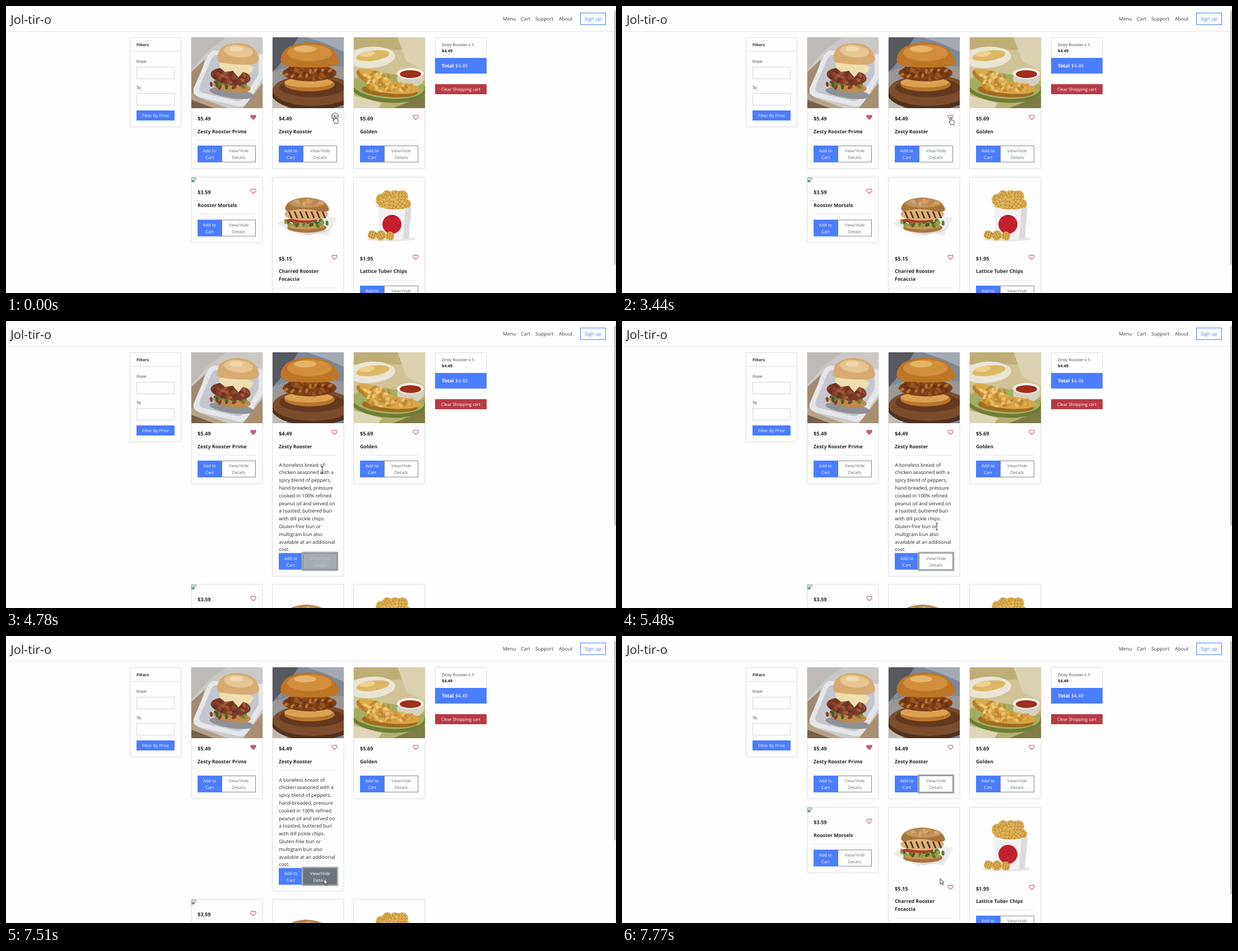
An HTML page that plays this animation: 1089 px wide and 514 px high, repeating every 8000 ms.

```html
<!DOCTYPE html>
<html lang="en">
<head>
<meta charset="utf-8">
<title>Menu</title>
<style>
  html, body { margin: 0; width: 100%; height: 100%; overflow: hidden; background: #fefefe; }
  svg { display: block; width: 1089px; height: 514px; }
  text { font-family: "Open Sans", "Noto Sans", sans-serif; text-rendering: geometricPrecision; white-space: pre; }
</style>
</head>
<body>
<svg id="stage" viewBox="0 0 1089 514" xmlns="http://www.w3.org/2000/svg"></svg>
<script>
const BLUE = '#4a7dff', GRAY = '#6c757d', INK = '#212529', PINK = '#bd5f7f', EDGE = '#dcdcdc';

// Markup helpers
const box = (x, y, w, h, fill, extra = '') =>
  `<rect x="${x}" y="${y}" width="${w}" height="${h}" fill="${fill}" ${extra}/>`;
const frame = (x, y, w, h, color, extra = '') =>
  box(x + .5, y + .5, w - 1, h - 1, 'none', `stroke="${color}" ${extra}`);
const line = (x1, x2, y, color) => box(x1, y, x2 - x1, 1, color);
const shape = (d, fill, extra = '') => `<path d="${d}" fill="${fill}" ${extra}/>`;
const oval = (x, y, rx, ry, fill, turn = 0) =>
  `<ellipse cx="${x}" cy="${y}" rx="${rx}" ry="${ry}" fill="${fill}" transform="rotate(${turn} ${x} ${y})"/>`;
const group = (x, y, body, extra = '') => `<g transform="translate(${x} ${y})" ${extra}>${body}</g>`;

// y is the middle of the capital letters
function label(x, y, str, size, { fill = INK, bold = false, mid = false, id = '' } = {}) {
  return `<text x="${x}" y="${(y + size * .36).toFixed(2)}" font-size="${size}" fill="${fill}"` +
    `${bold ? ' font-weight="700"' : ''}${mid ? ' text-anchor="middle"' : ''}${id ? ` id="${id}"` : ''}>${str}</text>`;
}

// Food pictures, 127 x 127
const crumbs = (n, x, y, rx, ry, colors) => Array.from({ length: n }, (_, i) => {
  const a = i * 2.4, r = Math.sqrt((i + .5) / n);
  return oval(x + rx * r * Math.cos(a), y + ry * r * Math.sin(a), 4.5, 2.6, colors[i % colors.length], i * 47);
}).join('');

const deluxe = () =>
  box(0, 0, 127, 127, '#cbc9c6') +
  shape('M0 0H62L30 24L0 58Z', '#bdbab8') +
  shape('M0 62L24 40L8 96L0 104Z', '#a08a70') +
  shape('M0 98L14 108L64 127H0Z', '#b6a288') +
  shape('M0 112L40 127H0Z', '#75604c') +
  shape('M92 127L127 82V127Z', '#a88f70') +
  shape('M40 24Q31 26 27 38L4 92Q2 104 16 108L82 123Q95 126 102 114L127 74V30Z', '#e4e6ea') +
  shape('M44 32Q37 33 34 42L14 90Q13 98 22 100L80 114Q90 116 96 106L120 66V36Z', '#c3c7cd') +
  oval(72, 100, 40, 9, '#8f9196', 8) +
  oval(72, 88, 34, 10, '#c08b48', 8) +
  crumbs(18, 68, 84, 33, 8, ['#4c5a2b', '#6d7b3a', '#8a3f30']) +
  oval(70, 70, 36, 15, '#7c3a28', 8) +
  crumbs(22, 70, 70, 32, 12, ['#8f4a30', '#a25a3a', '#6b3022']) +
  shape('M50 46Q78 36 112 54L104 66L92 62L84 72L74 60L60 62L50 54Z', '#f0dfae') +
  shape('M46 40Q45 12 82 10Q118 12 121 40Q117 50 100 49Q72 49 58 46Q47 46 46 40Z', '#d7ab70') +
  oval(84, 25, 26, 11, '#e6c592', 6) + oval(80, 21, 12, 5, '#f0d8ae');

const classic = () =>
  box(0, 0, 127, 127, '#7e8897') +
  shape('M0 0H46L20 40L0 62Z', '#575960') +
  shape('M60 0H127V26L96 12Z', '#a3a9b3') +
  shape('M0 62L40 48L127 52V92H0Z', '#9a9795') +
  shape('M0 92L30 110L26 127H0Z', '#c0bab2') +
  oval(72, 100, 74, 31, '#50301d') + oval(72, 95, 72, 28, '#7b4d2d') +
  oval(70, 90, 58, 17, '#63391f') +
  oval(66, 84, 45, 13, '#b8742c') + oval(64, 81, 43, 9, '#dda154') +
  oval(66, 64, 48, 15, '#7a3d14') +
  crumbs(34, 66, 64, 46, 12, ['#9a5420', '#6a3311', '#b96f2f', '#84461a']) +
  shape('M14 41Q16 12 64 9Q112 11 119 42Q119 52 98 53Q62 56 30 52Q15 50 14 41Z', '#bd7526') +
  oval(66, 28, 40, 15, '#d18e3c') + oval(58, 21, 20, 6, '#e7b569');

const strips = () =>
  box(0, 0, 127, 127, '#cfc397') +
  shape('M0 0H127V22H0Z', '#bfae78') +
  oval(30, 36, 44, 19, '#e9e5d4', -4) + oval(34, 33, 30, 9, '#dcb765', -8) + oval(24, 30, 14, 5, '#ecd08c', -8) +
  shape('M78 0H127V60L94 44Z', '#d9d1b0') +
  shape('M0 74L40 60L127 78V127H0Z', '#b6b06f') +
  oval(62, 92, 67, 25, '#6f7d35', 4) + oval(62, 88, 64, 22, '#a3ad62', 4) +
  shape('M0 104L50 118L44 127H0Z', '#dcd6b6') + shape('M70 127L127 104V127Z', '#7d7c46') +
  oval(101, 74, 24, 16, '#d6d0c0') + oval(101, 65, 24, 10, '#f4f0e6') + oval(101, 66, 19, 7, '#9d2f1c') +
  oval(64, 96, 50, 11, '#a06c20', 4) + oval(36, 75, 34, 12, '#b57f2b', 24) +
  oval(70, 90, 49, 11, '#d9a545', 4) + oval(40, 72, 33, 10, '#dcaa4d', 24) +
  crumbs(30, 64, 89, 44, 8, ['#e7bf6c', '#c08a31', '#d39c3e']) +
  crumbs(16, 40, 72, 25, 10, ['#ebc876', '#c18c35']);

const grilled = () =>
  shape('M7 83L30 66L116 72L98 104L62 98L54 106Z', '#ececec') +
  shape('M18 83L62 104L100 96L60 92Z', '#d9d9d8') +
  oval(61, 90, 35, 9, '#a9743a') + oval(60, 87, 33, 6, '#c6955a') +
  crumbs(26, 61, 81, 40, 7, ['#5d7a2c', '#86a041', '#47611f']) +
  oval(52, 77, 29, 4, '#b13b28') +
  oval(60, 66, 39, 11, '#d9b27a') +
  Array.from({ length: 7 }, (_, i) =>
    shape(`M${29 + i * 10} 61l5 12`, 'none', 'stroke="#593219" stroke-width="3"')).join('') +
  shape('M22 57Q23 38 60 36Q98 38 101 58Q98 64 80 60Q54 53 26 61Z', '#a8753b') +
  oval(62, 46, 32, 8, '#c2935a') + crumbs(9, 62, 44, 26, 4, ['#d0a76f', '#b98850']);

function lattice(x, y, r, turn) {
  let cuts = '';
  for (let i = -1; i <= 1; i++)
    cuts += `M${i * r * .5} ${-r * .85}V${r * .85}M${-r * .85} ${i * r * .5}H${r * .85}`;
  return `<g transform="translate(${x} ${y}) rotate(${turn})">${oval(0, 0, r, r, '#dfb458')}` +
    shape(cuts, 'none', 'stroke="#b07d28" stroke-width="1.2" stroke-dasharray="3 1.6"') + '</g>';
}
const chips = () =>
  oval(66, 110, 44, 4, '#e8e6e3') +
  [[50, 40, 11], [60, 33, 10], [73, 34, 11], [86, 34, 11], [92, 48, 10], [56, 50, 12], [70, 50, 13], [83, 52, 12]]
    .map(([x, y, r], i) => lattice(x, y, r, i * 31)).join('') +
  shape('M43 52Q70 62 103 53L98 109Q70 115 46 108Z', '#f3f1f2') +
  shape('M92 56L103 53L98 109L88 111Z', '#dcdadd') +
  oval(68, 84, 17, 17, '#c3202f') +
  [[33, 103, 8], [48, 104, 9], [64, 105, 8]].map(([x, y, r], i) => lattice(x, y, r, 20 + i * 40)).join('');

// Page parts
const heart = (x, y, full, id = '') => group(x, y,
  shape('M0 4.1L-4 .2C-5.6-1.6-4.4-4-2.4-4C-1.2-4-.4-3.2 0-2.5C.4-3.2 1.2-4 2.4-4C4.4-4 5.6-1.6 4 .2Z',
    PINK, `${id ? `id="${id}"` : ''} fill-opacity="${full ? 1 : 0}" stroke="${PINK}" stroke-width="1.1" stroke-linejoin="round"`));

function buttons(x, y, live) {
  const view = { fill: GRAY, mid: true };
  return box(x + 12, y, 43, 30, BLUE) +
    label(x + 33.5, y + 9.5, 'Add to', 7.6, { fill: '#fff', mid: true }) +
    label(x + 33.5, y + 21.5, 'Cart', 7.6, { fill: '#fff', mid: true }) +
    (live ? box(x + 54, y - 1, 63, 32, 'none', 'id="focus" stroke="#a9adb2" stroke-width="2.4"') +
      box(x + 55, y, 61, 30, GRAY, 'id="shade"') : '') +
    frame(x + 55, y, 61, 30, '#80878e') +
    `<g ${live ? 'id="caption"' : ''} fill="${GRAY}">` +
    label(x + 85.5, y + 9.5, 'View/Hide', 7.6, { ...view, fill: 'inherit' }) +
    label(x + 85.5, y + 21.5, 'Details', 7.6, { ...view, fill: 'inherit' }) + '</g>';
}

// dy is the distance of the text block from that of a first-row card
function card(x, top, dy, { pic, price, name, liked, live }) {
  const extra = (name.length - 1) * 13.8;
  const rule = 240 + dy + extra, bottom = 292 + dy + extra;
  return frame(x, top, 128.5, bottom - top, EDGE, `rx="1.5" ${live ? 'id="frame"' : ''}`) +
    (pic ? group(x + 1, top + (top < 100 ? 0 : 1), pic(), 'clip-path="url(#crop)"') : '') +
    label(x + 12, 201.5 + dy, price, 9.2, { bold: true }) +
    heart(x + 111.5, 199.3 + dy, liked, live ? 'like' : '') +
    name.map((s, i) => label(x + 12, 224.5 + dy + i * 13.8, s, 8.75, { bold: true })).join('') +
    line(x + 12, x + 116, rule, '#e6e6e6') +
    `<g ${live ? 'id="actions"' : ''}>${buttons(x, rule + 10, live)}</g>`;
}

const story = ['A boneless breast of', 'chicken seasoned with a', 'spicy blend of peppers,', 'hand-breaded, pressure',
  'cooked in 100% refined', 'peanut oil and served on', 'a toasted, buttered bun', 'with dill pickle chips.',
  'Gluten-free bun or', 'multigrain bun also', 'available at an additional', 'cost.'];

const header = label(8, 24, 'Jol-tir-o', 21.6) + line(0, 1086, 45, '#dbe8ea') +
  [['Menu', 887], ['Cart', 919], ['Support', 945], ['About', 987]]
    .map(([s, x]) => label(x, 23.3, s, 8.65, { fill: '#343a40' })).join('') +
  frame(1025, 12, 46, 22, BLUE) + label(1048, 23.3, 'Sign up', 8.65, { fill: BLUE, mid: true });

const filters = frame(221, 56, 92, 161, EDGE, 'rx="1.5"') + line(222, 312, 81, EDGE) +
  label(233, 69.3, 'Filters', 7, { bold: true }) +
  label(233, 99.5, 'From', 7.3) + frame(233, 109, 68, 22, '#d5d7da') +
  label(233, 146, 'To', 7.3) + frame(233, 156, 68, 22, '#d5d7da') +
  box(233, 187, 68, 18, BLUE) + label(267, 196.3, 'Filter By Price', 7.6, { fill: '#fff', mid: true });

const basket = frame(766, 56, 92, 40, EDGE, 'rx="1.5"') +
  label(778, 69.3, 'Zesty Rooster x 1:', 7.2, { fill: '#444' }) +
  label(778, 80.5, '$4.49', 7.4, { bold: true }) +
  box(766, 93, 92, 28, BLUE) + label(778, 107, 'Total', 8.65, { fill: '#fff', bold: true }) +
  label(802, 107, '$4.49', 8.65, { fill: '#fff' }) +
  box(766, 140, 92, 18, '#b93a44') + label(812, 149.3, 'Clear Shopping cart', 7.65, { fill: '#fff', mid: true });

const missing = group(331, 307,
  frame(0, 0, 9, 9, '#a9a9a9') + box(1, 1, 7, 5, '#c4d8f4') + shape('M1 8L1 6L4 4L7 8Z', '#5ea650') + shape('M9 4L4 9H9Z', '#fefefe'));

const row1 = card(330, 56, 0, { pic: deluxe, price: '$5.49', name: ['Zesty Rooster Prime'], liked: true }) +
  card(475, 56, 0, { pic: classic, price: '$4.49', name: ['Zesty Rooster'], live: true }) +
  card(620, 56, 0, { pic: strips, price: '$5.69', name: ['Golden'] });

const row2 = missing + card(330, 306, 132.6, { price: '$3.59', name: ['Rooster Morsels'] }) +
  card(475, 306, 250.8, { pic: grilled, price: '$5.15', name: ['Charred Rooster', 'Focaccia'] }) +
  card(620, 306, 250.8, { pic: chips, price: '$1.95', name: ['Lattice Tuber Chips'] });

const pointers = {
  hand: ['M-1.2.8Q0-.7 1.2.8V5Q2.2 4.2 3.2 5Q4.2 4.6 4.8 5.6Q6 5.4 6 7V10Q5.6 11.5 5 13.3H-.2Q-.8 11.5-3 8.6Q-3.6 7.2-2.2 7L-1.2 8Z', '#fff'],
  arrow: ['M0 0V10L2.4 7.9L4 11.3L5.4 10.7L3.9 7.5H6.8Z', '#fff'],
  beam: ['M-2-6H2M0-6V6M-2 6H2', 'none']
};

const stage = document.getElementById('stage');
stage.innerHTML = '<clipPath id="crop"><rect width="127" height="127" rx="1"/></clipPath>' +
  header + filters + basket + row1 +
  `<g id="story">${story.map((s, i) => label(487.3, 257.4 + i * 13.8, s, 8.65)).join('')}</g>` +
  `<g id="row2">${row2}</g>` +
  box(1085.5, 0, 3.5, 514, '#f6f6f6') + box(1086, 9, 2.6, 454, '#c3c3c3', 'id="thumb"') +
  '<g id="cursor"><circle id="ring" cx=".5" cy=".5" r="6" fill="none" stroke="#444"/>' +
  Object.entries(pointers).map(([k, [d, fill]]) =>
    shape(d, fill, `id="${k}" stroke="#222" stroke-width=".9" stroke-linejoin="round"`)).join('') + '</g>';

// Each step changes only the named values
const steps = [
  [0, { kind: 'hand', x: 587, y: 197, ring: 1, like: 0, shade: 0, focus: 0, open: 0 }],
  [130, { ring: 0 }], [570, { like: 1 }], [1750, { ring: 1 }], [1900, { ring: 0 }], [2030, { like: 0 }],
  [3440, { y: 199.5 }], [3560, { kind: 'arrow', y: 207 }],
  [3710, { x: 581, y: 224 }], [3840, { x: 573, y: 238 }],
  [3980, { kind: 'hand', x: 565, y: 261, shade: .25 }], [4110, { x: 564, y: 265.5, shade: .85 }], [4240, { shade: 1 }],
  [4520, { ring: 1, focus: 1 }], [4650, { ring: 0 }],
  [4780, { kind: 'beam', x: 564.5, y: 267, shade: .6, open: 1 }], [4930, { shade: 0 }],
  [5340, { x: 562.5, y: 312 }], [5480, { x: 562, y: 368 }], [5630, { x: 562.5, y: 399 }],
  [5770, { kind: 'hand', x: 567, y: 431, shade: .5 }], [5890, { shade: 1 }], [6040, { x: 568, y: 435 }],
  [7220, { ring: 1 }], [7510, { kind: 'arrow', ring: 0 }],
  [7630, { y: 434.5, shade: .6, open: 0 }], [7770, { shade: 0 }]
];
const LOOP = 8000;
const $ = Object.fromEntries([...stage.querySelectorAll('[id]')].map(e => [e.id, e]));
const set = (id, name, value) => $[id].setAttribute(name, value);
const show = (id, on) => set(id, 'visibility', on ? 'visible' : 'hidden');
const move = (id, x, y) => set(id, 'transform', `translate(${x} ${y})`);
const captionColor = k => `rgb(${[108, 117, 125].map(c => Math.round(c + (255 - c) * k))})`;

function draw(t) {
  const s = Object.assign({}, ...steps.filter(([at]) => at <= t).map(([, change]) => change));
  move('cursor', s.x, s.y);
  for (const kind in pointers) show(kind, kind === s.kind);
  show('ring', s.ring);
  show('focus', s.focus);
  show('story', s.open);
  set('like', 'fill-opacity', s.like);
  set('shade', 'fill-opacity', s.shade);
  set('caption', 'fill', captionColor(s.shade));
  move('actions', 0, s.open ? 165.5 : 0);
  move('row2', 0, s.open ? 165 : 0);
  set('frame', 'height', s.open ? 400.5 : 235);
  set('thumb', 'height', s.open ? 357 : 454);
}

const start = performance.now();
function tick() {
  draw((performance.now() - start) % LOOP);
  requestAnimationFrame(tick);
}
tick();
</script>
</body>
</html>
```
